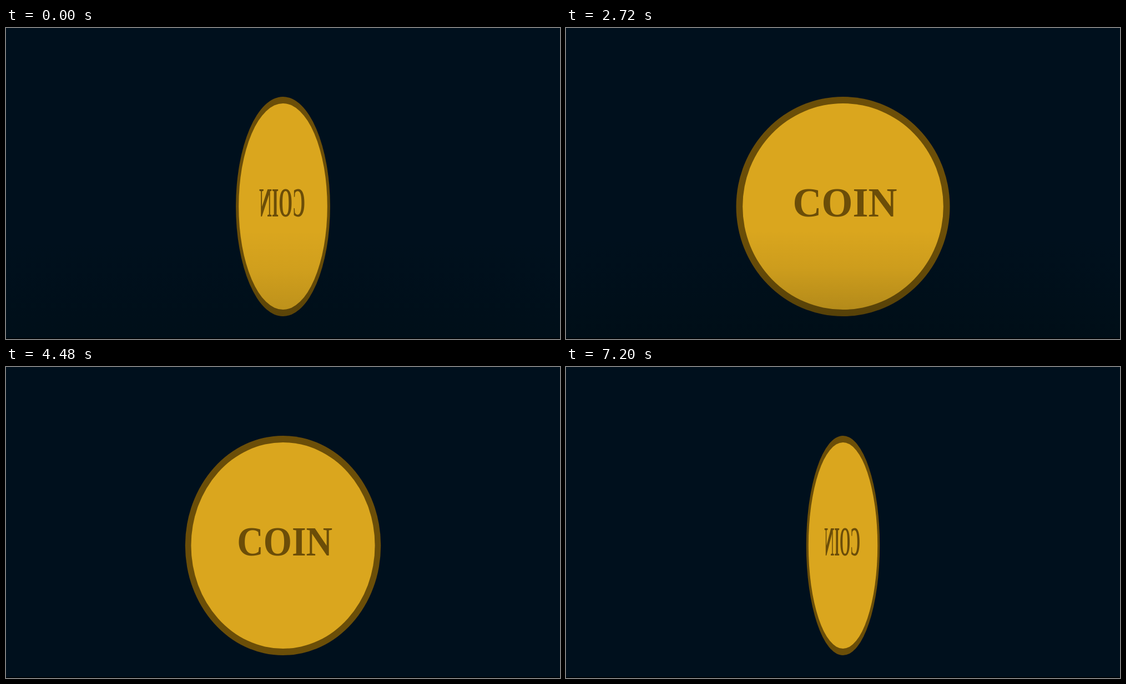
An HTML page for the animation above (7.28 s loop, 998 by 561 pixels).

```html
<!DOCTYPE html>
<html lang="en">
<head>
<meta charset="utf-8">
<title>Spinning coin</title>
<style>
html, body { margin: 0; width: 100%; height: 100%; overflow: hidden; background: #00101d; }
svg { display: block; width: 100vw; height: 100vh; }
text { font: bold 74px "Liberation Serif", "Times New Roman", serif; fill: #6b4d08; }
stop { stop-color: #000a08; }
</style>
</head>
<body>
<svg viewBox="0 0 998 561">
  <defs>
    <linearGradient id="fade" x1="0" y1="0" x2="0" y2="1">
      <stop offset="0" stop-opacity="0"/>
      <stop offset=".35" stop-opacity=".06"/>
      <stop offset="1" stop-opacity=".26"/>
    </linearGradient>
  </defs>
  <rect width="998" height="561" fill="#00101d"/>
  <g id="coin">
    <circle r="198" fill="#6b4e08"/>
    <circle r="186" fill="#daa61e"/>
    <text x="-93" y="18">COIN</text>
  </g>
  <rect id="shade" y="365" width="998" height="196" fill="url(#fade)"/>
  <rect y="559.5" width="998" height="1.5" fill="#000"/>
</svg>
<script>
const LOOP = 7280, STEP = 80, SPEED = 14.5 / STEP;
const coin = document.getElementById('coin');
const shade = document.getElementById('shade');

// cosine with n cycles per loop
const wave = (t, n) => Math.cos(2 * Math.PI * n * t / LOOP);

// steady spin in degrees with a slight unevenness
const angle = t => 239.7 + SPEED * t + 3.6 * wave(t, 2) + 1.3 * wave(t, 3);

const ramp = (t, from, span) => Math.min(1, Math.max(0, (t - from) / span));
const pulse = (t, on, off) => ramp(t, on, 300) - ramp(t, off, 300);

function draw(time) {
  const t = Math.floor(time % LOOP / STEP) * STEP;
  const turn = Math.cos(angle(t) * Math.PI / 180);
  coin.setAttribute('transform', `translate(499 322) scale(${turn.toFixed(4)} 1)`);
  shade.setAttribute('opacity', pulse(t, -220, 2720) + pulse(t, 5760, 6480));
}

const start = performance.now();
function tick() {
  draw(performance.now() - start);
  requestAnimationFrame(tick);
}
tick();
</script>
</body>
</html>
```
